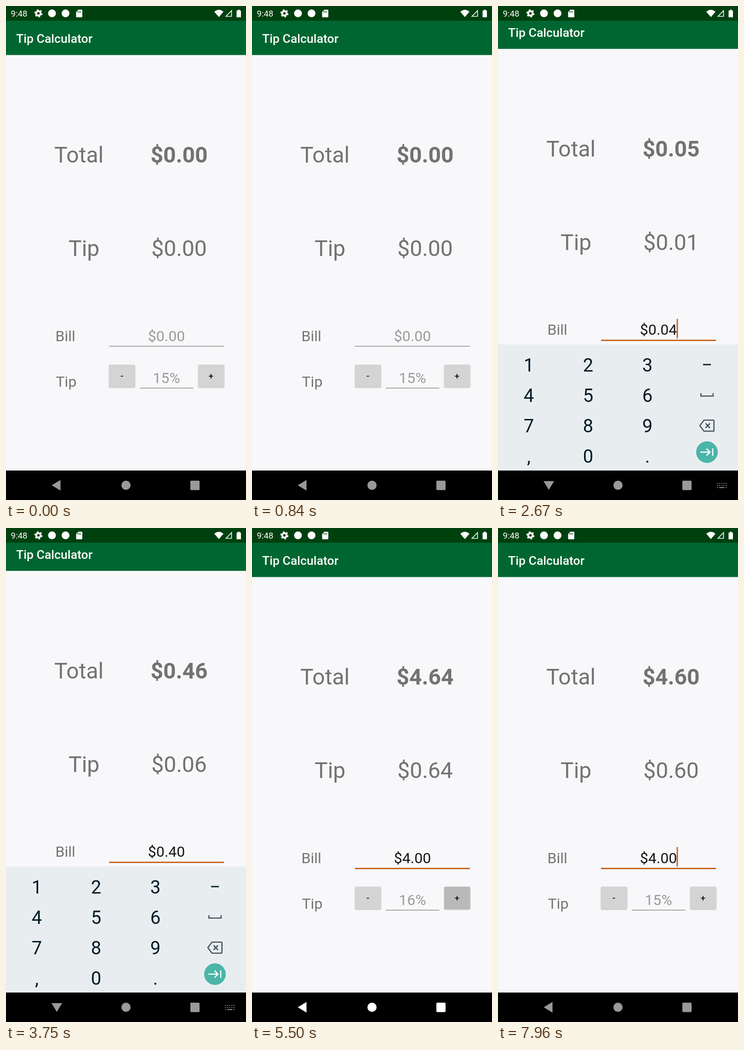
Recreate the animation shown at these times as an HTML page. Size 522 px wide and 1073 px high, loop 8 s.

```html
<!DOCTYPE html>
<html lang="en">
<head>
<meta charset="utf-8">
<title>Tip Calculator</title>
<style>
  html, body { margin: 0; width: 100%; height: 100%; overflow: hidden; background: #000; }
  svg { display: block; width: 522px; height: 1073px; font-family: Roboto, sans-serif; }
  .big { font-size: 48px; fill: #727272; }
  .mid { font-size: 32px; fill: #747474; }
  .center { text-anchor: middle; }
  .sign { font-size: 18.6px; font-weight: 500; text-anchor: middle; fill: #111; }
  .key { font-size: 40px; text-anchor: middle; fill: #021a24; }
  .line { fill: none; stroke: #46565d; stroke-width: 2.6; }
</style>
</head>
<body>
<svg viewBox="0 0 522 1073">
  <rect width="522" height="1073"/>

  <g id="app">
    <rect y="32" width="522" height="977" fill="#f8f8fb"/>
    <rect y="32" width="522" height="74.5" fill="#006631"/>
    <text x="22" y="80" font-size="26.6" font-weight="500" fill="#fff">Tip Calculator</text>
    <text class="big" x="105" y="340">Total</text>
    <text class="big center" id="total" x="376.5" y="340" font-weight="700"></text>
    <text class="big" x="136" y="543">Tip</text>
    <text class="big center" id="tip" x="376.5" y="543"></text>
    <text class="mid" x="107.5" y="727.5">Bill</text>
    <text class="mid center" id="bill" x="349" y="727.5"></text>
    <rect id="billLine" x="224" width="250"/>
    <rect id="cursor" y="693" width="2.7" height="42.5" fill="#c25c10"/>
    <text class="mid" x="108.5" y="826.5">Tip</text>
    <rect id="minus" x="224" y="779" width="56.5" height="49" rx="2.7"/>
    <text class="sign" x="252" y="810">-</text>
    <text class="mid center" id="percent" x="349" y="818.5" style="fill:#9b9b9b"></text>
    <rect x="291" y="829.3" width="116.5" height="1.4" fill="#858585"/>
    <rect id="plus" x="418" y="779" width="56.5" height="49" rx="2.7"/>
    <text class="sign" x="446" y="810">+</text>
  </g>

  <g id="keyboard">
    <rect y="735" width="522" height="274" fill="#e8eef0"/>
    <g id="keys"></g>
    <rect x="446" y="777.5" width="17" height="2.8" fill="#021a24"/>
    <path class="line" d="M441.3 841v6.3h26.6v-6.3"/>
    <path class="line" stroke-linejoin="round" d="M448 899.500h20q1.700 0 1.700 1.700v20.600q0 1.700-1.700 1.700h-20l-9-12zM451.500 906.500l9.500 10m0-10l-9.500 10"/>
    <circle cx="454.500" cy="969" r="23.500" fill="#4ab5a9"/>
    <path class="line" style="stroke:#fff" d="M440 969h21m-7.500-7.500l7.500 7.500-7.500 7.500M467 961v16"/>
  </g>

  <g fill="#fff">
    <rect width="522" height="32" fill="#00400f"/>
    <text x="10.500" y="23" font-size="18.600">9:48</text>
    <circle cx="70.500" cy="16" r="4.800" fill="none" stroke="#fff" stroke-width="4"/>
    <circle cx="70.500" cy="16" r="7.700" fill="none" stroke="#fff" stroke-width="2.200" stroke-dasharray="4 4.063"/>
    <circle cx="100" cy="16" r="8.500"/>
    <circle cx="129.500" cy="16" r="8.500"/>
    <path d="M157.500 8h7q1.500 0 1.500 1.500v13.500q0 1.500-1.500 1.500h-10.500q-1.500 0-1.500-1.500v-10z"/>
    <path d="M156 11v3.500m3-3.500v3.500m3-3.500v3.500" stroke="#00400f" stroke-width="1.300"/>
    <path d="M453 12.500q10-8.500 20 0l-10 11.500z"/>
    <path d="M478.500 22.500h12v-12.500z" fill="none" stroke="#fff" stroke-width="1.700"/>
    <path d="M504 8h4.500v2h2.500v14.500h-9.500v-14.500h2.500z"/>
  </g>

  <rect id="touch" x="43" y="1009" width="134" height="64" rx="32" fill="#fff"/>
  <g id="nav">
    <path id="back" d="M99.500 1041l19-11.500v23z"/>
    <circle cx="261" cy="1041" r="10"/>
    <rect x="401" y="1031" width="20" height="20.500" rx="2"/>
  </g>
  <g id="switcher" fill="none" stroke="#8d8d8d" stroke-width="2">
    <path stroke-dasharray="2 2.600" d="M476.500 1037h20.500M476.500 1041.500h20.500"/>
    <path d="M476.500 1046h2m2.600 0h11.400m2.600 0h2"/>
  </g>
</svg>
<script>
const LOOP = 8000;
const OPEN = 1400, CLOSE = 4241, SLIDE = 210;
const FOCUS = 1350;
const typed = [[2590, 4], [3220, 40], [3860, 400]];      // time, bill in cents
const plusTaps = [[5270, 5400], [6020, 6150]];           // finger down, finger up
const minusTaps = [[6830, 6960], [7420, 7550]];

const el = {};
document.querySelectorAll('[id]').forEach(node => el[node.id] = node);

const ramp = (t, from, to) => Math.min(1, Math.max(0, (t - from) / (to - from)));
const mix = (a, b, p) => Math.round(a + (b - a) * p);
const gray = v => `rgb(${v},${v},${v})`;
const money = cents => '$' + (cents / 100).toFixed(2);
const released = (taps, t) => taps.filter(tap => t >= tap[1]).length;
const show = (node, on) => node.setAttribute('opacity', Number(on));

['123', '456', '789', ',0.'].forEach((row, r) =>
  [...row].forEach((label, c) => {
    const key = document.createElementNS('http://www.w3.org/2000/svg', 'text');
    key.setAttribute('class', 'key');
    key.setAttribute('x', 67 + 129 * c);
    key.setAttribute('y', 793.5 + 66.2 * r);
    key.textContent = label;
    el.keys.append(key);
  }));

function drawButton(node, taps, t) {
  let dark = 0, lift = 0;
  for (const [down, up] of taps) {
    dark += ramp(t, down, down + 80) - ramp(t, up + 100, up + 350);
    lift += ramp(t, down, down + 100) - ramp(t, up, up + 100);
  }
  node.setAttribute('fill', gray(mix(212, 185, dark)));
  node.style.filter = `drop-shadow(0 ${1 + 3 * lift}px ${1 + 2.5 * lift}px rgba(0,0,0,.28))`;
}

function drawForm(t) {
  const entry = typed.filter(([at]) => t >= at).pop();
  const cents = entry ? entry[1] : 0;
  const rate = 15 + released(plusTaps, t) - released(minusTaps, t);
  const tip = Math.round(cents * rate / 100);
  const focused = t >= FOCUS;

  el.total.textContent = money(cents + tip);
  el.tip.textContent = money(tip);
  el.bill.textContent = money(cents);
  el.bill.style.fill = entry ? '#171717' : '#9b9b9b';
  el.percent.textContent = rate + '%';

  el.billLine.setAttribute('fill', focused ? '#c25c10' : '#858585');
  el.billLine.setAttribute('y', focused ? 738.2 : 738.3);
  el.billLine.setAttribute('height', focused ? 2.8 : 1.4);

  const blinkStart = entry ? entry[0] : FOCUS;
  show(el.cursor, focused && (t - blinkStart) % 1000 < 500);
  el.cursor.setAttribute('x', entry ? 388.6 : 308.6);

  drawButton(el.plus, plusTaps, t);
  drawButton(el.minus, minusTaps, t);
}

function drawKeyboard(t) {
  const enter = ramp(t, OPEN, OPEN + SLIDE);
  const leave = ramp(t, CLOSE, CLOSE + SLIDE);
  const pan = 13.4 * (1 - (1 - enter) ** 3) * (1 - leave) ** 3;
  const shown = enter * (1 - leave);

  el.app.setAttribute('transform', `translate(0 ${-pan})`);
  el.keyboard.setAttribute('transform', `translate(0 ${81 * (1 - shown)})`);
  show(el.keyboard, shown);
  show(el.switcher, enter === 1 && leave === 0);

  const turn = -90 * (1 - (1 - enter) ** 2) * (1 - leave) ** 2;
  el.back.setAttribute('transform', `rotate(${turn} 110 1040.500)`);
}

function drawNav(t) {
  const lit = ramp(t, 4160, 4260) - ramp(t, 6670, 7420);
  el.nav.setAttribute('fill', gray(mix(153, 255, lit)));
  show(el.touch, 0.2 * (ramp(t, 4160, 4260) - ramp(t, 4350, 4600)));
}

function draw(t) {
  drawForm(t);
  drawKeyboard(t);
  drawNav(t);
}

const start = performance.now();
function tick() {
  draw((performance.now() - start) % LOOP);
  requestAnimationFrame(tick);
}
tick();
</script>
</body>
</html>
```
